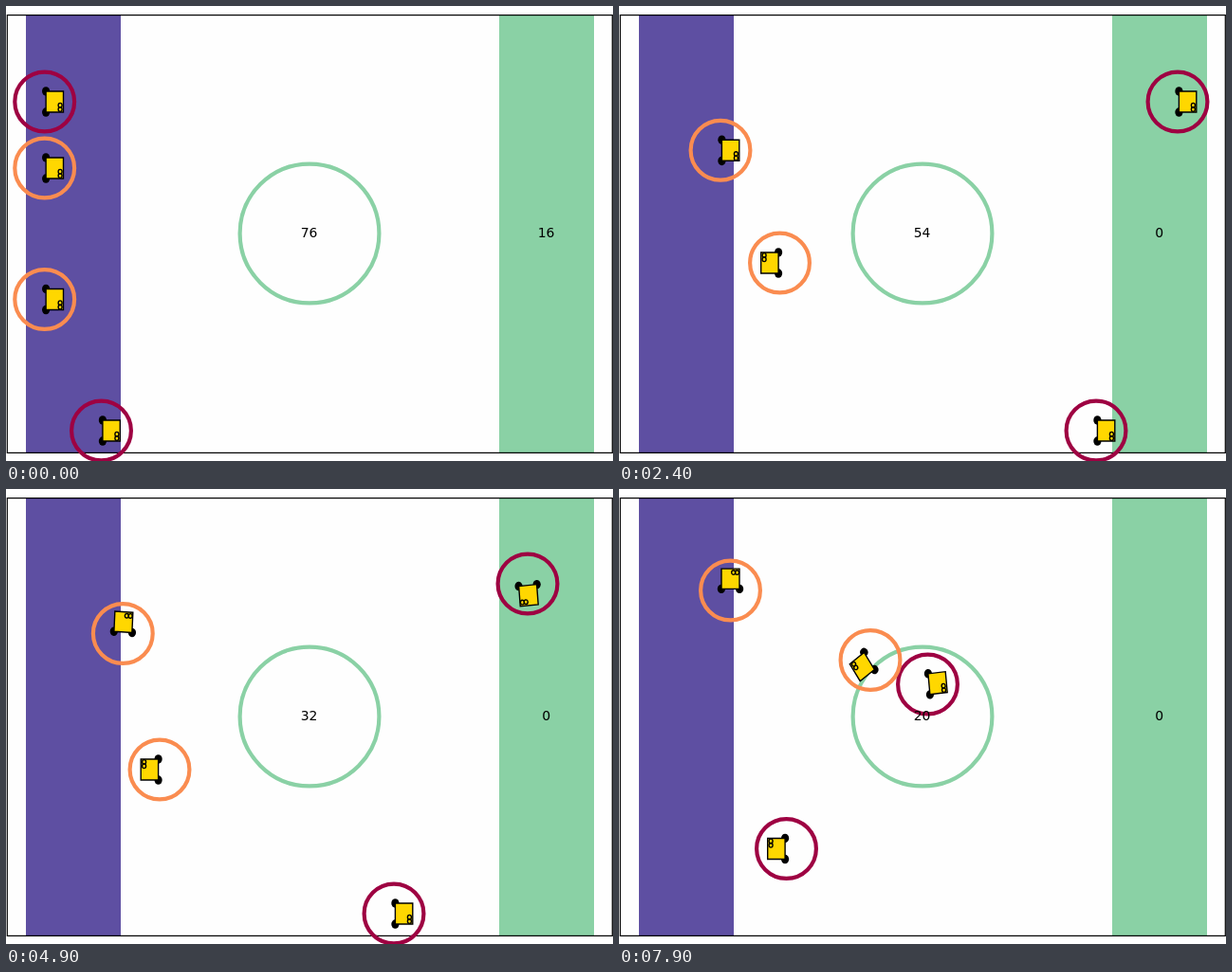
An HTML page that plays this animation: 640 by 480 pixels, repeating every 8 s.

```html
<!DOCTYPE html>
<html lang="en">
<head>
<meta charset="utf-8">
<title>Foraging robots</title>
<style>
html, body { margin: 0; width: 100%; height: 100%; overflow: hidden; background: #fff; }
svg { display: block; width: 640px; height: 480px; }
text { font: 13.9px "DejaVu Sans", sans-serif; text-anchor: middle; }
.halo { fill: none; stroke-width: 4.17; }
.body { fill: #ffd700; }
.body, .eye { stroke: #000; stroke-width: 1.39; vector-effect: non-scaling-stroke; }
.eye { fill: none; }
</style>
</head>
<body>
<svg viewBox="0 0 640 480">
  <rect x="1.3" y="9.6" width="638" height="461.8" fill="#fefefe"/>
  <rect x="21" y="9.6" width="100" height="461.8" fill="#5e4fa2"/>
  <rect x="520" y="9.6" width="100" height="461.8" fill="#8ad1a5"/>
  <circle class="halo" cx="320" cy="240" r="73.4" stroke="#8ad1a5"/>
  <rect x="1.3" y="9.6" width="638" height="461.8" fill="none" stroke="#000" stroke-width="1.2"/>
  <g id="robots"></g>
  <text id="core" x="319.6" y="244.4"></text>
  <text id="strip" x="569.6" y="244.4"></text>
</svg>
<script>
const LOOP = 8000, STEP = 100;
const MAROON = '#9e0142', ORANGE = '#fa8c50';
const byId = id => document.getElementById(id);

// A route is a chain of straight drives, turns on the spot and pauses.
class Robot {
  constructor(color, x, y) {
    this.keys = [{ t: 0, x, y, h: 0 }];
    this.node = document.createElementNS('http://www.w3.org/2000/svg', 'g');
    this.node.innerHTML = `
      <circle class="halo" r="31.4" stroke="${color}"/>
      <g>
        <circle cx="1.4" cy="-9.6" r="4.1"/><circle cx="1.4" cy="9.6" r="4.1"/>
        <rect class="body" x="1.4" y="-9.5" width="18.4" height="19"/>
        <circle class="eye" cx="16.4" cy="3.2" r="2"/><circle class="eye" cx="16.4" cy="7" r="2"/>
      </g>`;
    this.chassis = this.node.lastElementChild;
    byId('robots').append(this.node);
  }
  add(t, change) {
    this.keys.push({ ...this.keys.at(-1), ...change, t });
    return this;
  }
  go(t, x, y) { return this.add(t, { x, y }); }
  turn(t, h) { return this.add(t, { h }); }
  wait(t) { return this.add(t, {}); }
  draw(t) {
    const i = this.keys.findIndex(k => k.t > t);
    const b = i < 0 ? this.keys.at(-1) : this.keys[i];
    const a = i < 0 ? b : this.keys[i - 1];
    const p = b === a ? 0 : (t - a.t) / (b.t - a.t);
    const mix = key => a[key] + (b[key] - a[key]) * p;
    this.node.setAttribute('transform', `translate(${mix('x')} ${mix('y')})`);
    // the plot's vertical axis is slightly taller than its horizontal one
    this.chassis.setAttribute('transform', `scale(1 1.157) rotate(${mix('h')})`);
  }
}

const robots = [
  new Robot(MAROON, 40.7, 101)
    .go(1300, 330.5, 101).go(2400, 589, 101).wait(2900)
    .turn(3000, -66).wait(3100).turn(3200, 0).wait(3750)
    .go(4800, 550, 100).turn(4900, 85).go(5180, 552, 172)
    .turn(5200, 180).go(5400, 481.5, 173).go(6600, 183, 174)
    .turn(6620, 165).go(6700, 158.5, 176).go(6880, 115, 186)
    .turn(6960, 5).go(7850, 325.5, 206).turn(7900, -6),

  new Robot(ORANGE, 40.7, 171)
    .go(720, 67, 171).turn(780, -90).go(1270, 67, 153)
    .turn(1300, -66).turn(1340, 0).go(1800, 86, 152.3)
    .go(2400, 107, 152.3).go(2550, 112.5, 152.3).wait(3770)
    .go(3900, 117, 152.3).go(4080, 123.3, 152.5).wait(4800)
    .turn(4900, -87).wait(6100).turn(6200, -109).wait(6300)
    .go(6700, 118, 137.5).turn(6750, -90).go(7200, 117.5, 120.5)
    .go(7600, 117.5, 107),

  new Robot(ORANGE, 40.7, 309.5)
    .go(1300, 234, 309.5).go(1360, 243, 309.5).turn(1500, -79)
    .go(1750, 244, 271).turn(1850, -180).go(2400, 169.5, 271)
    .go(2920, 95.5, 271).turn(2980, -353).go(3850, 243, 291.5)
    .turn(3900, -393).wait(4000).turn(4200, -540)
    .go(4900, 162, 296).go(5540, 88, 296).turn(5600, -725)
    .go(6620, 242, 279).turn(6700, -799).go(7400, 265, 180.5)
    .wait(7700).turn(7900, -935),

  new Robot(MAROON, 100.5, 448)
    .go(1300, 473, 448).go(1546, 543.5, 448).go(2400, 503, 448)
    .go(3900, 446.5, 448).go(4900, 409, 448).go(5980, 368.5, 448)
    .turn(6020, -90).go(6350, 368.5, 460).wait(6920)
    .go(7200, 368.5, 380).turn(7220, -180).go(7900, 176.5, 379.5)
];

const counters = {
  core: [[0, 76], [1800, 54], [4100, 32], [7600, 20]],
  strip: [[0, 16], [1600, 0]]
};

const start = performance.now();
function frame() {
  const t = Math.floor(((performance.now() - start) % LOOP) / STEP) * STEP;
  robots.forEach(r => r.draw(t));
  for (const id in counters) {
    byId(id).textContent = counters[id].findLast(([from]) => from <= t)[1];
  }
  requestAnimationFrame(frame);
}
frame();
</script>
</body>
</html>
```
